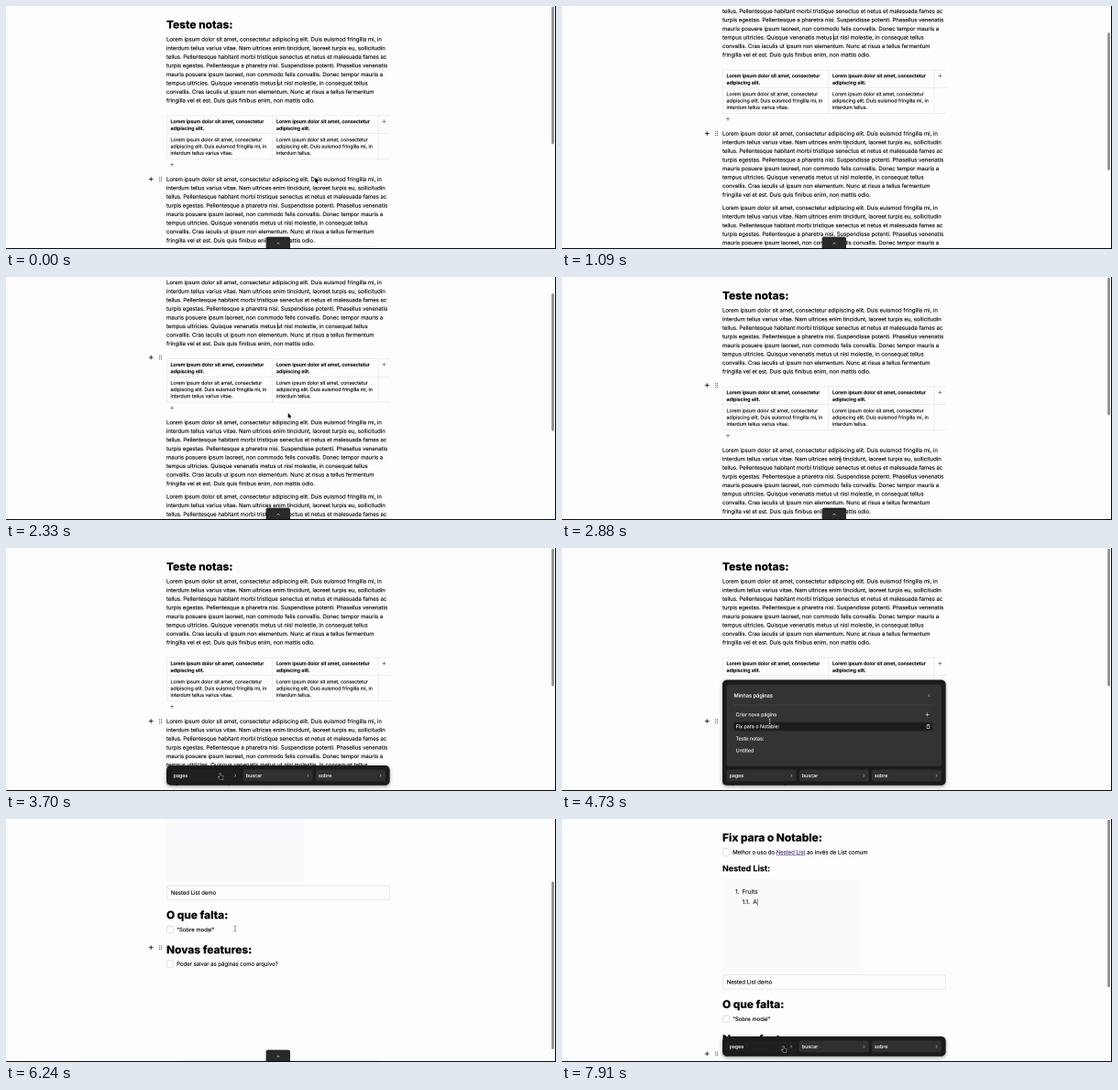
Animation, 600 px wide and 266 px high, one loop 8 s. Source, as an HTML page with a canvas:

```html
<!DOCTYPE html>
<html lang="pt">
<head>
<meta charset="utf-8">
<title>Notas</title>
<style>
html, body { margin: 0; width: 100%; height: 100%; overflow: hidden; background: #fdfdfe; }
canvas { display: block; width: 600px; height: 266px; }
</style>
</head>
<body>
<canvas id="stage"></canvas>
<script>
const W = 600, H = 266, LOOP = 8000;
const dpr = window.devicePixelRatio || 1;
const K = 4 * dpr; // drawn large, then scaled down for even small text

const stage = document.getElementById('stage');
stage.width = W * dpr;
stage.height = H * dpr;
const view = stage.getContext('2d');
const sheet = document.createElement('canvas');
sheet.width = W * K;
sheet.height = H * K;
const ctx = sheet.getContext('2d');

const BODY = 5.98, SMALL = 5.24, LABEL = 5.35, TITLE = 11.85;
const LEFT = 175, LEAD = 9.57, INK = '#050507', LINE = '#e6e6ea';
const OPEN_LIST = 3880, SWITCH = 4880, LAG = 100;

const lorem = [
  'Lorem ipsum dolor sit amet, consectetur adipiscing elit. Duis euismod fringilla mi, in',
  'interdum tellus varius vitae. Nam ultrices enim tincidunt, laoreet turpis eu, sollicitudin',
  'tellus. Pellentesque habitant morbi tristique senectus et netus et malesuada fames ac',
  'turpis egestas. Pellentesque a pharetra nisi. Suspendisse potenti. Phasellus venenatis',
  'mauris posuere ipsum laoreet, non commodo felis convallis. Donec tempor mauris a',
  'tempus ultricies. Quisque venenatis metus ut nisl molestie, in consequat tellus',
  'convallis. Cras iaculis ut ipsum non elementum. Nunc at risus a tellus fermentum',
  'fringilla vel et est. Duis quis finibus enim, non mattis odio.'
];

function ramp(t, from, to) {
  const p = Math.min(1, Math.max(0, (t - from) / (to - from)));
  return p * p * (3 - 2 * p);
}

const pages = [
  {
    content: 466,
    blocks: [20, 36.5, 118.5, 189.5, 271],
    scroll: t => 50 * (ramp(t, 390, 940) - ramp(t, 1090, 1730))
      + 30.5 * (ramp(t, 1940, 2120) - ramp(t, 2330, 2800)),
    draw: notesPage
  },
  {
    content: 383,
    blocks: [20, 36.5, 54, 70, 178, 203, 219, 238.5, 257],
    scroll: t => 119 * (ramp(t, 5550, 5940) - ramp(t, 6120, 6570)),
    draw: fixesPage
  }
];

const pageAt = t => pages[t < SWITCH ? 0 : 1];

// Pointer moves: start, end, x, y
const moves = [
  [390, 900, 311, 152], [2270, 2320, 308.5, 152], [2700, 3090, 297, 259],
  [3350, 3680, 234, 250], [4120, 4360, 226.5, 190], [4900, 5400, 250, 120],
  [7030, 7400, 297, 259], [7520, 7770, 242, 252]
];

function pointerAt(t) {
  let x = 338, y = 191;
  for (const [from, to, nx, ny] of moves) {
    const p = ramp(t, from, to);
    x += (nx - x) * p;
    y += (ny - y) * p;
  }
  return { x, y };
}

// The toolbar sits by the block that was under the pointer a moment ago.
function toolbarY(t) {
  const page = pageAt(t), then = Math.max(0, t - LAG);
  const y = pointerAt(then).y + page.scroll(then);
  return page.blocks.filter(b => b - 6 <= y).pop();
}

function setFont(size, weight = 400) {
  ctx.font = `${weight} ${size}px Inter, sans-serif`;
}

// The thin outline gives small text the weight of smoothed screen type.
function text(str, x, y, size = BODY, weight = 400, color = INK) {
  setFont(size, weight);
  ctx.fillStyle = ctx.strokeStyle = color;
  ctx.lineWidth = 0.14;
  ctx.fillText(str, x, y);
  ctx.strokeText(str, x, y);
  return x + ctx.measureText(str).width;
}

const title = (str, y) => text(str, LEFT, y, TITLE, 800);

function rect(x, y, w, h, color) {
  ctx.fillStyle = color;
  ctx.fillRect(x, y, w, h);
}

function round(x, y, w, h, r, fill, stroke) {
  ctx.beginPath();
  ctx.roundRect(x, y, w, h, r);
  if (fill) { ctx.fillStyle = fill; ctx.fill(); }
  if (stroke) { ctx.strokeStyle = stroke; ctx.lineWidth = 0.6; ctx.stroke(); }
}

function path(points, color, width = 0.6) {
  ctx.beginPath();
  points.forEach(([x, y]) => ctx.lineTo(x, y));
  ctx.strokeStyle = color;
  ctx.lineWidth = width;
  ctx.stroke();
}

function plus(x, y, r, color, width = 0.6) {
  path([[x - r, y], [x + r, y]], color, width);
  path([[x, y - r], [x, y + r]], color, width);
}

function chevron(x, y, turn, color) {
  ctx.save();
  ctx.translate(x, y);
  ctx.rotate(turn * Math.PI / 2);
  path([[-0.7, -1.5], [0.7, 0], [-0.7, 1.5]], color);
  ctx.restore();
}

function castShadow(color, blur, dy = 0) {
  ctx.shadowColor = color;
  ctx.shadowBlur = blur * K;
  ctx.shadowOffsetY = dy * K;
}

function toolbar(y) {
  plus(158.2, y, 2.3, '#111', 0.85);
  for (let i = 0; i < 6; i++) rect(167.2 + (i % 2) * 1.8, y - 2.3 + (i >> 1) * 1.9, 0.9, 0.9, '#333');
}

function paragraph(y) {
  lorem.forEach((line, i) => text(line, LEFT, y + i * LEAD));
}

function table() {
  for (const y of [120, 139.7, 167.5]) rect(LEFT, y - 0.3, 244, 0.6, LINE);
  for (const x of [175.3, 290.5, 406]) rect(x - 0.3, 120, 0.6, 47.5, LINE);
  const first = 'Lorem ipsum dolor sit amet, consectetur';
  const second = 'adipiscing elit. Duis euismod fringilla mi, in';
  ['interdum tellus varius vitae.', 'interdum tellus.'].forEach((last, col) => {
    const x = 179.5 + col * 115.5;
    const lines = (list, y, weight) =>
      list.forEach((s, i) => text(s, x, y + i * 7.33, SMALL, weight));
    lines([first, 'adipiscing elit.'], 128.3, 600);
    lines([first, second, last], 148.2, 400);
  });
  plus(412.4, 126.3, 2, '#555');
  plus(181, 173.7, 2, '#555');
}

function notesPage(t) {
  title('Teste notas:', 24.6);
  paragraph(38.6);
  if (t < 3500 && t % 1000 < 500) {
    setFont(BODY);
    const x = LEFT + ctx.measureText('tempus ultricies. Quisque venenatis metus ').width;
    rect(x - 0.3, 80.3, 0.6, 7.6, '#000');
  }
  table();
  for (let i = 0; i < 2; i++) paragraph(191.7 + i * 81.3);
}

function checkRow(str, y) {
  round(175.4, y - 3.8, 7.4, 7.4, 1.6, '#fff', '#d0d0d4');
  return text(str, 186.2, y + 2.1);
}

function demo(t) {
  const size = 6.5, base = 81.8, color = '#222';
  const nested = t >= 7600;
  const word = 'Fruits'.slice(0, Math.max(0, (t - 5900) / 220 | 0));
  rect(LEFT, 66, 150, 100.5, '#faf9fb');
  text('1.', 189, base, size, 400, color);
  let end = text(word, 196.5, base, size, 400, color);
  if (nested) {
    text('1.1.', 196.5, base + 11.3, size, 400, color);
    end = text(t >= 7900 ? 'A' : '', 208.3, base + 11.3, size, 400, color);
  }
  rect(end + 0.3, base - 5.9 + (nested ? 11.3 : 0), 0.5, 7.6, color);
}

function fixesPage(t) {
  title('Fix para o Notable:', 24.6);
  const start = checkRow('Melhor o uso do ', 36.5);
  const end = text('Nested List', start, 38.6, BODY, 400, '#52307c');
  rect(start, 39.4, end - start, 0.5, '#52307c');
  text(' ao invés de List comum', end, 38.6);
  text('Nested List:', LEFT, 57.2, 8.95, 700);
  demo(t);
  round(175.3, 170.8, 243.2, 15.4, 1, null, '#dedee3');
  text('Nested List demo', 179.8, 180.6);
  title('O que falta:', 207.1);
  checkRow('"Sobre modal"', 219);
  title('Novas features:', 245.1);
  checkRow('Poder salvar as páginas como arquivo?', 256.5);
}

function scrollbar(offset, content) {
  const k = H / content;
  round(595.2, offset * k + 0.6, 2.7, H * k - 1.2, 1.3, '#8c8c8c');
}

function trash(x, y) {
  path([[x - 2, y - 1.6], [x + 2, y - 1.6]], '#ddd', 0.5);
  rect(x - 0.7, y - 2.4, 1.4, 0.5, '#ddd');
  round(x - 1.4, y - 1.5, 2.8, 3.8, 0.4, null, '#ddd');
}

function pageList(py) {
  round(179.5, 149.3, 234.5, 89.7, 4, '#333');
  text('Minhas páginas', 187.5, 163.5, 5.65, 500, '#f2f2f2');
  chevron(400.5, 161.5, 2, '#aaa');
  rect(187.5, 171.7, 216.5, 0.5, '#505050');
  const rows = ['Criar nova página', 'Fix para o Notable:', 'Teste notas:', 'Untitled'];
  rows.forEach((name, i) => {
    const y = 182.3 + i * 13.1;
    if (Math.abs(py - y) < 6.5) {
      round(187.3, y - 4.8, 217, 9.6, 1.5, '#1c1c1c');
      if (i) trash(399.5, y);
    }
    text(name, 189.6, y + 1.9, LABEL, 400, '#f0f0f0');
    if (!i) plus(398.6, y, 2.1, '#ddd');
  });
}

function dock(t, pointer) {
  const open = ramp(t, 3180, 3450) - ramp(t, 4900, 5180) + ramp(t, 7440, 7700);
  const expanded = t >= OPEN_LIST && t < SWITCH;

  ctx.save();
  castShadow('rgba(0,0,0,.3)', 6);
  rect(194, 268, 213, 10, '#000');
  ctx.restore();

  const tab = 252.7 + open * 14;
  round(283.6, tab, 26.4, 16, [2, 2, 0, 0], '#2a2a2a');
  chevron(297, tab + 7.2, -1, '#ccc');

  ctx.save();
  ctx.translate(0, (1 - open) * 30);
  const top = expanded ? 144.3 : 238;
  ctx.save();
  if (open) castShadow('rgba(0,0,0,.35)', 4, 1.5);
  round(LEFT, top, 243.7, 259.8 - top, 5, '#1b1b1b');
  ctx.restore();
  if (expanded) pageList(pointer.y);
  ['pages', 'buscar', 'sobre'].forEach((name, i) => {
    const x = 179.5 + i * 79.2;
    const hot = pointer.y > 242 && pointer.x > x && pointer.x < x + 76;
    round(x, 242.6, 76, 12.8, 2.5, hot ? '#1f1f1f' : '#303030');
    text(name, x + 3.1, 250.9, LABEL, 400, '#f4f4f4');
    chevron(x + 70.6, 249.2, 0, '#aaa');
  });
  ctx.restore();
}

function polygon(points) {
  ctx.beginPath();
  points.forEach(([x, y]) => ctx.lineTo(x, y));
  ctx.closePath();
  ctx.lineJoin = 'round';
  ctx.strokeStyle = '#fff';
  ctx.lineWidth = 0.8;
  ctx.stroke();
  ctx.fillStyle = '#000';
  ctx.fill();
}

function drawPointer(t, { x, y }, offset) {
  const inGap = t < SWITCH && y + offset > 176 && y + offset < 185;
  ctx.save();
  ctx.translate(x, y);
  if (y > 242) {
    polygon([[-0.8, -3], [0.2, -3], [0.4, -0.8], [2.9, -0.2], [2.3, 3.3], [-0.5, 3.3], [-2.4, 0.6], [-0.7, 1]]);
  } else if (inGap || t < 30) {
    polygon([[-0.8, -3.2], [-0.8, 2.4], [0.5, 1.4], [1.4, 3.3], [2.2, 3], [1.3, 1.1], [2.9, 0.9]]);
  } else {
    const ink = t >= OPEN_LIST && t < SWITCH ? '#ddd' : '#444';
    path([[0, -2.8], [0, 2.8]], ink);
    for (const side of [-1, 1]) path([[-1.1, side * 3.1], [0, side * 2.7], [1.1, side * 3.1]], ink, 0.5);
  }
  ctx.restore();
}

function draw(t) {
  ctx.setTransform(K, 0, 0, K, 0, 0);
  ctx.textRendering = 'geometricPrecision';
  ctx.lineJoin = 'round';
  rect(0, 0, W, H, '#fdfdfe');

  const page = pageAt(t), offset = page.scroll(t), pointer = pointerAt(t);
  ctx.save();
  ctx.translate(0, -offset);
  page.draw(t);
  toolbar(toolbarY(t));
  ctx.restore();

  scrollbar(offset, page.content);
  dock(t, pointer);
  rect(0, H - 1, W, 1, '#0c0c0c');
  rect(W - 1, 0, 1, H, '#050505');
  drawPointer(t, pointer, offset);

  view.imageSmoothingQuality = 'high';
  view.drawImage(sheet, 0, 0, stage.width, stage.height);
}

function loop(now) {
  draw(now % LOOP);
  requestAnimationFrame(loop);
}
requestAnimationFrame(loop);
</script>
</body>
</html>
```
